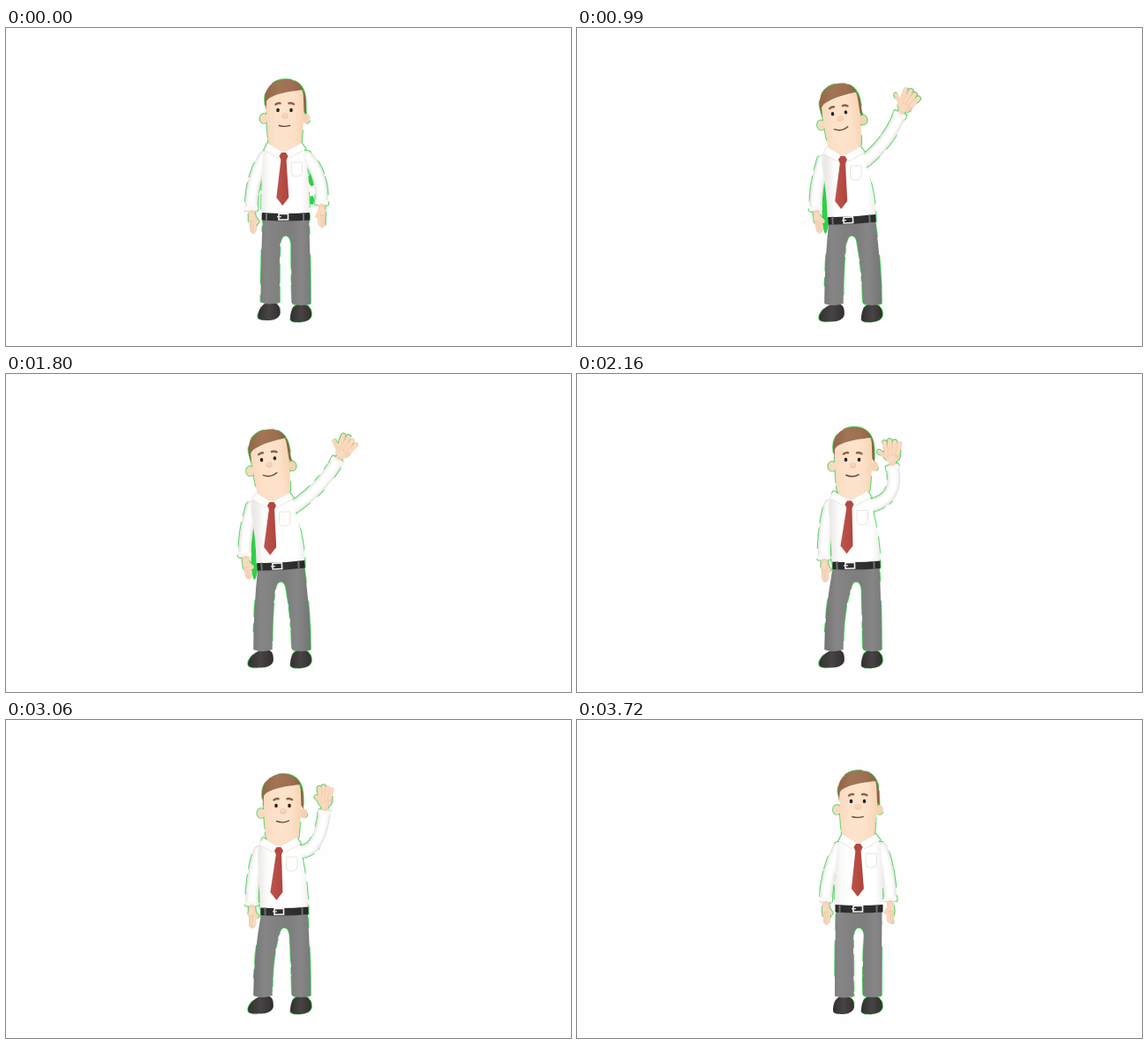
An HTML page with a canvas for the animation above (3.75 s loop, 640 by 360 pixels).

```html
<!DOCTYPE html>
<html lang="en">
<head>
<meta charset="utf-8">
<title>Waving man</title>
<style>
html, body { margin: 0; width: 640px; height: 360px; overflow: hidden; background: #fefefe; }
canvas { display: block; }
</style>
</head>
<body>
<canvas id="stage" width="640" height="360"></canvas>
<script>
const W = 640, H = 360, LOOP = 3750, STEP = 30;
const RIGHT_FOOT = [334, 323.5];
const GREEN = '#2fd048';

// head: x, y, tilt, look x, look y, smile    chest: x, y    waist: x, y, turn, tilt
// left: bend x, y, wrist x, y, hand angle
// right: bend x, y, wrist x, y, hand angle, hand open    spill: left, right
const start = {
  head: [316, 100, 0, 0, 0, .1], chest: [314.5, 145], waist: [317, 213, -3, 0], foot: [298, 321.5],
  left: [277, 175, 278, 206, 174], right: [359, 165, 357.5, 199, -180, 0], spill: [0, 1]
};
const raise = {
  head: [308.5, 103, 0, 1.5, 3, .4], chest: [305, 148], waist: [310.5, 215.5, -6, 0], foot: [288.5, 323],
  left: [269, 178, 269, 205, 176], right: [357, 146, 357.5, 105, -20, .6], spill: [0, 0]
};
const bend = {
  ...raise, head: [312, 102, 1, 1, 2, .2], chest: [309, 147], waist: [313, 214, -5, 0], foot: [291, 320],
  left: [273, 177, 273, 205, 175], right: [362, 172, 356, 150, -70, .3]
};
const out = {
  ...raise, head: [300, 104.5, -7, -1.5, -1.5, .9], chest: [301, 149], waist: [311.5, 216.5, -4.5, -3],
  left: [270, 178, 270.5, 206, 168], right: [354, 128, 366, 97, 31, 1], spill: [1, 0]
};
const inward = {
  ...raise, head: [312.5, 102, 0, -6, 2, .9], chest: [306, 148.5], waist: [313.5, 216, -8.5, -1.5],
  left: [278, 180, 278, 209, 180], right: [369, 130, 353, 101, -27, 1]
};
const upright = {
  ...raise, head: [313, 102, 0, -.5, 2, .6], chest: [308.5, 147.5], waist: [316.5, 216, -7.5, -1],
  left: [279, 180, 280, 209, 176], right: [366, 140, 357, 104, 0, 1]
};
const ease = {
  ...upright, head: [313, 103, 0, 1, 1, .5], chest: [309, 148], waist: [315.5, 216, -6.5, -1],
  left: [278, 180, 278.5, 209, 178], right: [356, 147, 361, 103, 2, .75]
};
const lower = {
  ...ease, head: [316, 101, 0, 0, 0, .3], chest: [314, 146], waist: [318, 214, -4, 0], foot: [295, 319],
  left: [280, 176, 280, 207, 176], right: [362, 148, 362, 167, 140, .3]
};
const end = {
  ...start, head: [318.5, 99, 0, 0, 0, .1], chest: [318.5, 144], waist: [319.5, 213, -1.5, 0], foot: [302, 323.5],
  left: [283, 172, 281.5, 205, 176], right: [354, 170, 355, 204, 180, 0], spill: [0, 0]
};
const reach = (dx, extra) => ({ ...out, right: [354 + dx / 2, 128, 366 + dx, 97, 31, 1], ...extra });

const keys = [
  [0, start], [230, bend], [450, raise], [860, reach(4)], [990, out], [1440, inward],
  [1800, reach(10)], [2160, upright], [2685, reach(4, { left: [268, 178, 268, 206, 170] })],
  [3060, ease], [3270, { ...ease, right: [356, 144, 364, 108, 20, .75] }],
  [3480, lower], [3720, end]
];

function poseAt(t) {
  let i = 0;
  while (i < keys.length - 2 && t >= keys[i + 1][0]) i++;
  const k = [-1, 0, 1, 2].map(d => keys[Math.min(keys.length - 1, Math.max(0, i + d))]);
  const [ta, tb, tc, td] = k.map(e => e[0]);
  const span = tc - tb, u = Math.min(1, (t - tb) / span), v = u * u, w = v * u;
  const slope = (a, b, c, t0, t1) => (b - a) * (c - b) > 0 ? (c - a) / (t1 - t0) * span : 0;
  const pose = {};
  for (const part in start) {
    pose[part] = start[part].map((_, n) => {
      const [a, b, c, d] = k.map(e => e[1][part][n]);
      return (2 * w - 3 * v + 1) * b + (w - 2 * v + u) * slope(a, b, c, ta, tc) +
        (3 * v - 2 * w) * c + (w - v) * slope(b, c, d, tb, td);
    });
  }
  return pose;
}

function layer() {
  const c = document.createElement('canvas');
  c.width = W; c.height = H;
  return c.getContext('2d');
}
const stage = document.getElementById('stage').getContext('2d');
const g = layer(), rim = layer(), mask = layer();

// Uneven green patches that break up the rim
let seed = 11;
const rnd = () => (seed = seed * 16807 % 2147483647) / 2147483647;
mask.fillStyle = GREEN;
for (let i = 0; i < 260; i++) {
  mask.beginPath();
  mask.arc(255 + rnd() * 150, 52 + rnd() * 285, 4 + rnd() * 6, 0, 7);
  mask.fill();
}

function blend(x0, x1, ...colors) {
  const s = g.createLinearGradient(x0, 0, x1, 0);
  colors.forEach((c, i) => s.addColorStop(i / (colors.length - 1), c));
  return s;
}
function shape(d, fill, stroke, width = 1) {
  const p = new Path2D(d);
  if (fill) { g.fillStyle = fill; g.fill(p); }
  if (stroke) { g.strokeStyle = stroke; g.lineWidth = width; g.stroke(p); }
}
function oval(x, y, rx, ry, fill, c = g) {
  c.fillStyle = fill;
  c.beginPath();
  c.ellipse(x, y, rx, ry, 0, 0, 7);
  c.fill();
}
function at(x, y, deg, draw) {
  g.save();
  g.translate(x, y);
  g.rotate(deg * Math.PI / 180);
  draw();
  g.restore();
}

function shoe(x, y, toe) {
  const l = -12 - toe * .35, r = 12 + toe * .35, top = toe * .7;
  at(x, y, 0, () => {
    shape(`M${l} 5 C${l} -1 ${top - 10} -11 ${top} -11 C${top + 9} -11 ${r} -6 ${r} 1
      C${r} 6 ${r - 7} 9.5 0 9.5 C${l + 4} 9.5 ${l} 9 ${l} 5Z`, blend(l, r, '#333030', '#484443', '#322f2f'));
  });
}

function legs({ waist: [x, y], foot: [fx, fy] }) {
  const rx = RIGHT_FOOT[0], cuff = fy - 11, toe = (302 - fx) * .5;
  const lx = fx + toe * .25;
  shoe(fx, fy, toe);
  shoe(...RIGHT_FOOT, 0);
  shape(`M${x - 26} ${y} Q${lx - 10} ${y + 52} ${lx - 10} ${cuff} Q${lx} ${cuff + 4} ${lx + 11.5} ${cuff}
    Q${lx + 11} ${y + 55} ${x - 6.5} 244 Q${x - 5} 235 ${x - .5} 235
    Q${x + 5} 235 ${x + 6} 244 Q${rx - 11} ${y + 60} ${rx - 10} 312
    Q${rx} 316 ${rx + 11} 312 Q${rx + 11} ${y + 52} ${x + 26} ${y}Z`,
    blend(x - 36, x + 32, '#747475', '#868687', '#808081', '#7d7d7e', '#868687', '#767677'));
}

function torso({ chest: [x, y], waist: [wx, wy, turn, tilt] }) {
  shape(`M${x - 15} ${y - 12} Q${x - 24} ${y - 8} ${x - 24} ${y + 4} Q${wx - 28} ${y + 40} ${wx - 28} ${wy - 2}
    Q${wx} ${wy + 1} ${wx + 27} ${wy - 2} Q${wx + 27} ${y + 40} ${x + 26} ${y + 4} Q${x + 26} ${y - 8} ${x + 18} ${y - 12}Z`,
    blend(wx - 29, wx + 28, '#eceae8', '#fcfcfb', '#ffffff', '#ffffff', '#ffffff', '#fefefe', '#eeecea'));
  shape(`M${x + 8.5} ${y + 7} h12.5 v12 q-1 4 -5 4 h-3.5 q-4 0 -4 -4Z`, '#fefefe', '#e8e6e4');
  at(wx, wy, tilt, () => {
    shape('M-27 -4 Q0 -2 27 -4 v8.5 Q0 6.5 -27 4.5Z', blend(-26, 26, '#2b2a2a', '#343333', '#292828'));
    shape('M20 -4 v9 M-22 -4 v9', null, '#6f6f70', 2);
    shape(`M${turn - 5} -2.5 h10.5 v6.5 h-10.5Z`, '#2e2d2d', '#f3f3f2', 1.6);
    shape(`M${turn - 7} .7 h5`, null, '#e8e8e6', 1.2);
  });
}

function collar({ chest: [x, y], waist: [, , turn] }) {
  const tip = turn * .4;
  at(x, y, 0, () => {
    shape('M-18 -15 L-22 -7 L-7 2 L0 -4Z M20 -15 L25 -8 L7 2 L0 -4Z', '#fdfdfc', '#e4e1de', .8);
    shape(`M-3 3 L3 3 L${tip + 7} 47 L${tip} 56 L${tip - 7} 47Z`, blend(-7, 7, '#b9534b', '#b54a43', '#ad443e'));
    shape('M-2.5 -4 L2.5 -4 L5 0 L3 4.5 L-3 4.5 L-5 0Z', '#b34a42');
  });
}

function head([x, y, tilt, lx, ly, smile]) {
  at(x, y, tilt, () => {
    oval(-24, 2.5, 4.5, 5.5, '#f8dabf');
    oval(24, 2.5, 4.5, 5.5, '#f5d3b5');
    shape(`M-21 -20 C-21.5 0 -20.5 10 -19 28 Q-17 38 0 40 Q17 38 19 28 C20.5 10 22 0 22 -20
      Q20 -38 0 -38 Q-20 -38 -21 -20Z`, blend(-22, 22, '#f8d9bd', '#fde1c8', '#fde3cb', '#fde0c6', '#f6d3b4'));
    shape(`M-21.5 -6 L-23 -18 C-23 -34 -12 -42 1 -42 C14 -42 23 -34 23.5 -18 L24 -2 L21.5 -6 L20.5 -30
      C8 -28.5 -4 -27 -13 -23 Q-19 -21 -21 -17Z`, blend(-23, 24, '#946648', '#a27456', '#9e6f51', '#8e6044'));
    g.translate(lx, ly);
    g.lineCap = 'round';
    shape('M-10.5 -13.5 Q-8 -15.3 -5.5 -14.8 M4.5 -14.8 Q7.5 -15.3 10 -13.8', null, '#8d6246', 2.5);
    oval(-8, -7, 1.8, 2.2, '#2b2320');
    oval(7, -7, 1.8, 2.2, '#2b2320');
    oval(0, -.5, 3.7, 3.2, '#f3caac');
    oval(-.3, -1.2, 2.6, 2, '#f8d5ba');
    const m = 6 + 2 * smile;
    shape(`M${-m - .5} 10.5 Q0 ${12 + 3 * smile} ${m - .5} ${10.5 - smile}`, null, '#67483a', 1.4);
    g.lineCap = 'butt';
  });
}

function hand([, , x, y, deg, open = 0], mirror) {
  at(x, y, deg, () => {
    g.scale(mirror, 1);
    g.lineCap = 'round';
    shape('M0 -4 V-10', null, '#f6d3b5', 8);
    oval(0, -12, 4.6 + 4.8 * open, 8.5, blend(-9, 9, '#fadabf', '#fadcc2', '#f2ccad'));
    for (let i = -1.5; i <= 1.5; i++) {
      const tip = -25.5 - 3 * open + Math.abs(i + .3) * 1.8;
      const d = `M${i * (1.5 + 2.6 * open)} -14 L${i * (1.5 + 4.3 * open)} ${tip}`;
      shape(d, null, '#e9c2a3', 3.8 + 1.5 * open);
      shape(d, null, '#fadabf', 3 + 1.5 * open);
    }
    shape(`M${2 - 6 * open} -9 L${5 - 20 * open} ${-14 - 2 * open}`, null, '#f9d7ba', 4.8);
    g.lineCap = 'butt';
  });
}

function sleeve(sx, sy, [bx, by, wx, wy]) {
  const d = `M${sx} ${sy} Q${bx} ${by} ${wx} ${wy}`;
  [[14.5, '#e6e4e1'], [12, '#f3f1f0'], [9, '#fbfbfa'], [5, '#ffffff']].forEach(([w, c]) => {
    oval(sx, sy, w / 2, w / 2, c);
    shape(d, null, c, w);
  });
  at(wx, wy, Math.atan2(wy - by, wx - bx) * 180 / Math.PI, () => {
    shape('M-4 -7.5 H1 Q2.5 0 1 7.5 H-4Z', '#f9f8f7');
    shape('M1 -7.5 Q2.5 0 1 7.5', null, '#d6d1cc');
  });
}

function spills({ spill: [l, r], chest: [x], waist: [wx] }) {
  if (l > .5) oval(wx - 30, 205, 4 * l, 28, GREEN, stage);
  if (r > .5) {
    oval(x + 32, 171, 4, 8, GREEN, stage);
    oval(x + 32, 195, 2.5, 5, GREEN, stage);
  }
}

function render(t) {
  const pose = poseAt(t), [x, y] = pose.chest;
  g.clearRect(0, 0, W, H);
  legs(pose);
  sleeve(x - 22, y + 1, pose.left);
  sleeve(x + 26, y + 1, pose.right);
  torso(pose);
  head(pose.head);
  collar(pose);
  hand(pose.left, -1);
  hand(pose.right, 1);

  rim.globalCompositeOperation = 'source-over';
  rim.clearRect(0, 0, W, H);
  rim.drawImage(g.canvas, 0, 0);
  rim.globalCompositeOperation = 'source-in';
  rim.drawImage(mask.canvas, 0, 0);

  stage.fillStyle = '#fefefe';
  stage.fillRect(0, 0, W, H);
  spills(pose);
  for (const [dx, dy] of [[-.7, 0], [.7, 0], [0, -.7], [0, .5]]) stage.drawImage(rim.canvas, dx, dy);
  stage.drawImage(g.canvas, 0, 0);
}

const begin = performance.now();
function tick() {
  const t = (performance.now() - begin) % LOOP;
  render(Math.floor(t / STEP) * STEP);
  requestAnimationFrame(tick);
}
tick();
</script>
</body>
</html>
```
